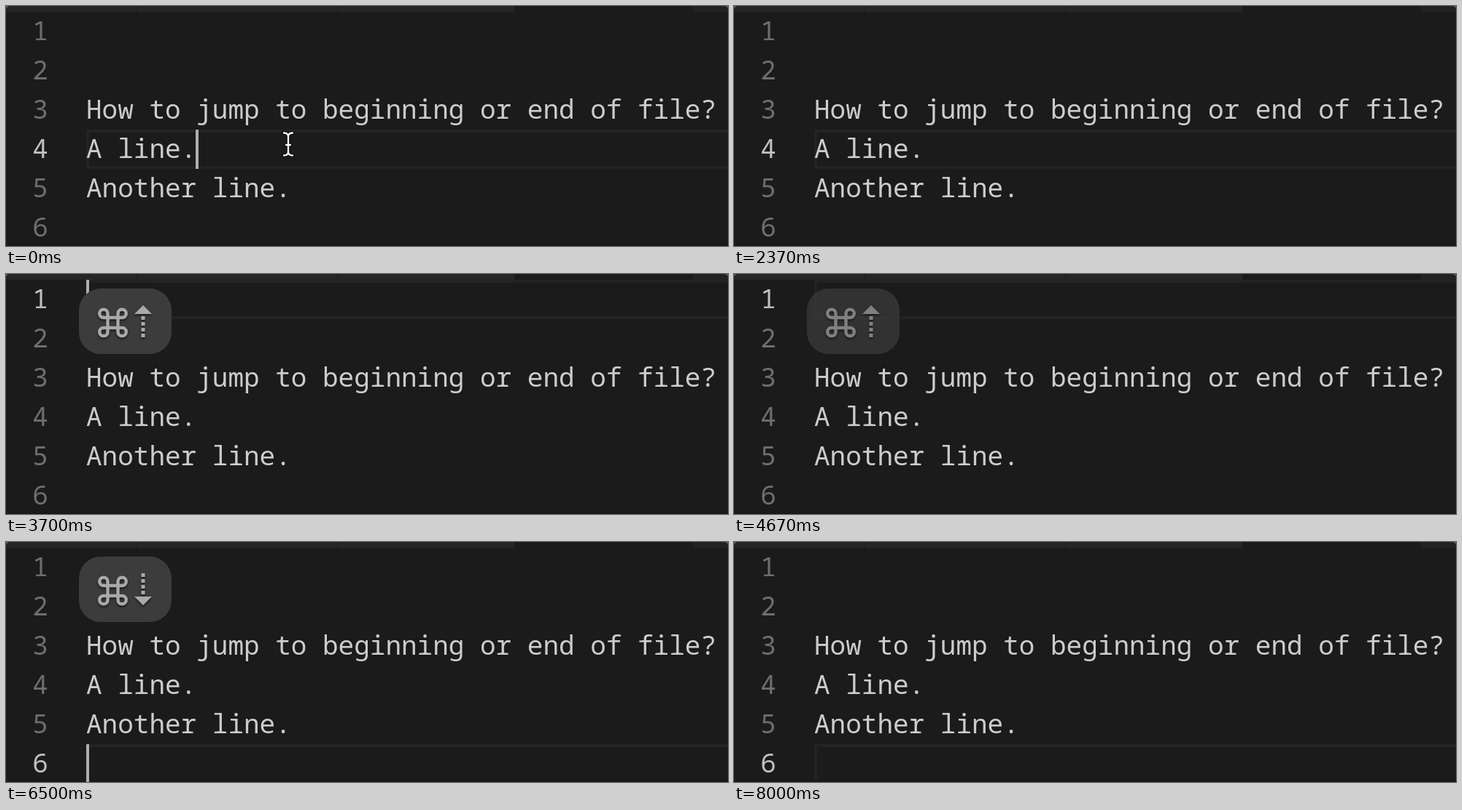
An HTML page for the animation above (8.43 s loop, 990x330 px).

```html
<!DOCTYPE html>
<html lang="en">
<head>
<meta charset="utf-8">
<title>Jump to beginning or end of file</title>
<style>
  html, body { margin: 0; width: 100%; height: 100%; overflow: hidden; background: #1b1b1b; }
  svg { display: block; width: 990px; height: 330px; }
  text { font: 36px "Noto Sans Mono", "DejaVu Sans Mono", monospace; fill: #cccccc; }
  #numbers text { fill: #6e6e6e; text-anchor: middle; }
  #numbers text.active { fill: #c0c0c0; }
  .glyph { filter: drop-shadow(0 2px 1.5px #0009); }
</style>
</head>
<body>
<svg viewBox="0 0 990 330">
  <defs>
    <path id="loop" d="M-7-7v-5.65a5.65 5.65 0 1 0-5.65 5.65h19.65"/>
    <path id="beam" d="M-6-15.5q5 0 6 4q1-4 6-4M-6 15.5q5 0 6-4q1 4 6 4M0-12v24M-3 1h6"/>
  </defs>

  <!-- tab bar -->
  <rect width="990" height="8" fill="#262626"/>
  <path d="M179 0v8M455 0v8" stroke="#202020" stroke-width="2"/>
  <rect x="697" width="245" height="8" fill="#1b1b1b"/>
  <rect x="942" width="48" height="8" fill="#222"/>
  <path d="M0 0h4l-4 3zM990 0h-4l4 3z" fill="#585858"/>

  <path id="row" d="M992 2H112V52H992" fill="none" stroke="#232323" stroke-width="4"/>
  <rect y="328" width="990" height="2" fill="#1a1617"/>
  <g id="numbers"></g>
  <g id="lines"></g>
  <rect id="caret" width="4" height="54" fill="#aeaeae"/>

  <g id="badge">
    <rect x="100" y="20" width="127" height="90" rx="30" fill="#3c3c3c"/>
    <g class="glyph">
      <g transform="translate(146.5 67)" fill="none" stroke="#a9a9a9" stroke-width="4.4">
        <use href="#loop"/>
        <use href="#loop" transform="rotate(90)"/>
        <use href="#loop" transform="rotate(180)"/>
        <use href="#loop" transform="rotate(270)"/>
      </g>
      <g id="arrow" fill="#a9a9a9">
        <path d="M188 43l12 12h-24z"/>
        <path d="M188 58v29" stroke="#a9a9a9" stroke-width="5" stroke-dasharray="5 3"/>
      </g>
    </g>
  </g>

  <g id="pointer" fill="none" stroke-linecap="round">
    <use href="#beam" stroke="#000" stroke-width="4.5"/>
    <use href="#beam" stroke="#fff" stroke-width="2.4"/>
  </g>
</svg>
<script>
const LOOP = 8430, UP = 3700, DOWN = 6500, FRAME = 100 / 3;
const BLINK = 500, ROW = 54, TOP = 8, LEFT = 110;
const content = ["", "", "How to jump to beginning or end of file?", "A line.", "Another line.", ""];
const $ = id => document.getElementById(id);
const set = (id, name, value) => $(id).setAttribute(name, value);

function addText(parent, x, line, string) {
  const el = document.createElementNS("http://www.w3.org/2000/svg", "text");
  el.setAttribute("x", x);
  el.setAttribute("y", 47 + ROW * line);
  el.textContent = string;
  $(parent).append(el);
}

content.forEach((string, i) => {
  addText("numbers", 47, i, i + 1);
  addText("lines", LEFT, i, string);
});

function drawPointer(t) {
  const step = [1070, 1100, 1130].filter(s => t >= s).length / 3;
  const x = 387 + 488 * step ** 2.74, y = 190 - 80 * step ** 1.81;
  set("pointer", "transform", `translate(${x} ${y})`);
  set("pointer", "opacity", t < 1170 ? 1 : 0);
}

function draw(t) {
  const jump = t >= DOWN ? DOWN : t >= UP ? UP : 0;
  const line = { 0: 3, [UP]: 0, [DOWN]: 5 }[jump];
  const y = TOP + ROW * line;

  set("row", "transform", `translate(0 ${y})`);
  [...$("numbers").children].forEach((el, i) => el.classList.toggle("active", i === line));

  // each jump restarts the blink with the caret visible
  const phase = jump ? t - jump : t + 130;
  set("caret", "x", jump ? LEFT : 260);
  set("caret", "y", y);
  set("caret", "opacity", Math.floor(phase / BLINK) % 2 ? 0 : 1);

  const faded = Math.max(0, Math.floor((t - jump - 930) / FRAME + 1.1));
  set("badge", "opacity", jump ? Math.max(0, 1 - faded / 7) : 0);
  set("arrow", "transform", jump === DOWN ? "matrix(1 0 0 -1 0 130)" : "");

  drawPointer(t);
}

const start = performance.now();
function tick() {
  draw((performance.now() - start) % LOOP);
  requestAnimationFrame(tick);
}
tick();
</script>
</body>
</html>
```
